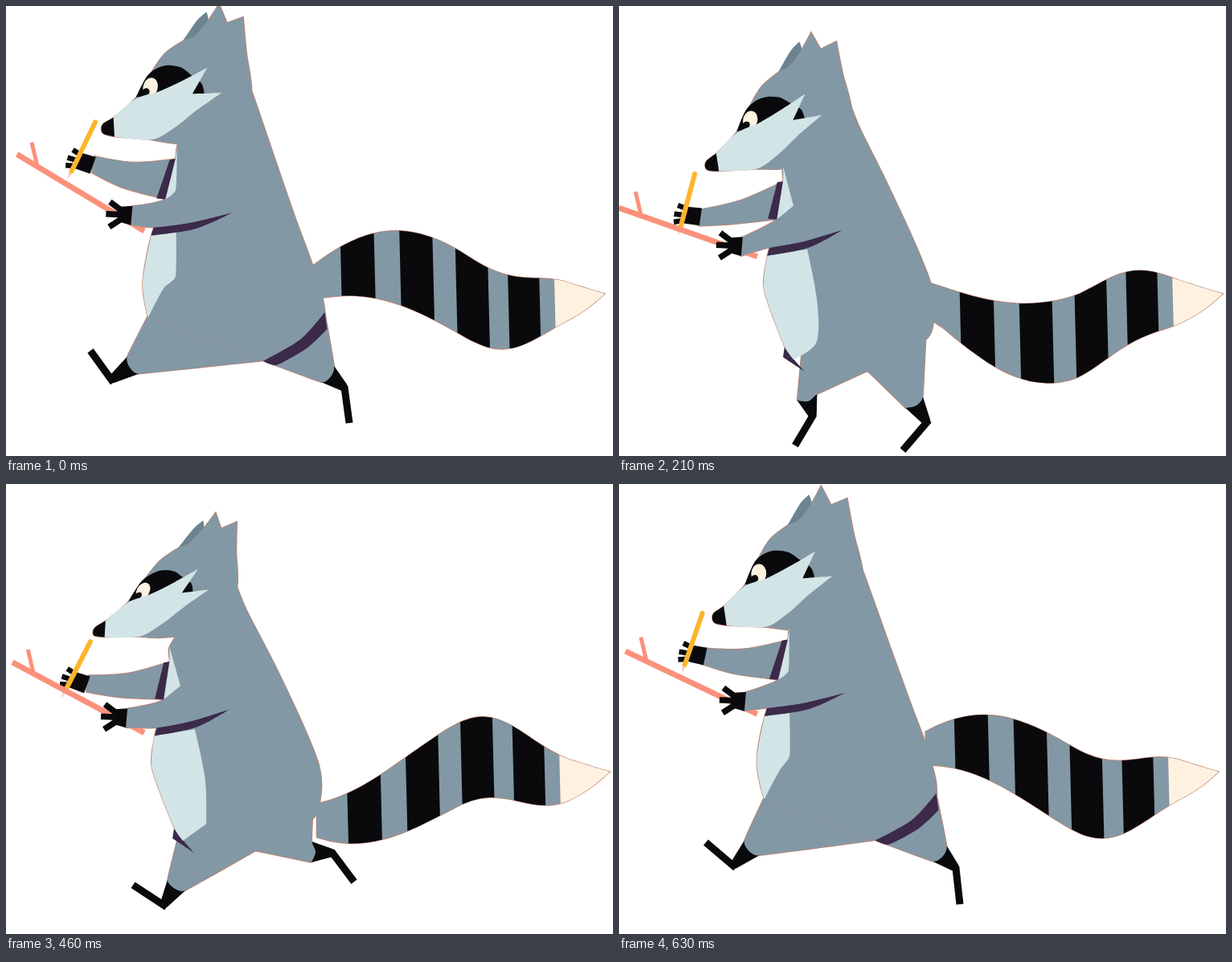
These frames come from a looping animation (755x560 px, 680 ms). An HTML page:

```html
<!DOCTYPE html>
<html lang="en">
<head>
<meta charset="utf-8">
<title>Running raccoon</title>
<style>
  html, body { margin: 0; width: 100%; height: 100%; overflow: hidden; background: #fff; }
  svg { display: block; width: 100%; height: 100%; }
</style>
</head>
<body>
<svg id="stage" viewBox="0 0 755 560"></svg>
<script>
const GREY = '#8398a5', LIGHT = '#d2e4e6', BLACK = '#0a0a0c', CREAM = '#fff1e0';
const PURPLE = '#3b2a4a', EAR = '#6b8490', YELLOW = '#fdb52a', PINK = '#fb917b', EDGE = '#cf7a60';
const LOOP = 680;

// Points are [x, y] pairs.
const pts = s => s.split('  ').map(p => p.split(' ').map(Number));
const mix = (a, b, t) => [a[0] + (b[0] - a[0]) * t, a[1] + (b[1] - a[1]) * t];
const off = (p, x, y) => [p[0] + x, p[1] + y];
const clamp = v => Math.max(0, Math.min(1, v));
const smooth = v => { const t = clamp(v); return t * t * (3 - 2 * t); };
// One step of the run lasts eight drawings, a full stride sixteen.
const swing = (k, mid, amp, lag) => mid + amp * Math.cos((k - lag) * Math.PI / 4);

// Closed outline, smooth at gentle bends and sharp at tight ones.
function blob(p) {
  const n = p.length, at = i => p[(i + n) % n];
  const tangent = i => {
    const [ax, ay] = at(i - 1), [bx, by] = at(i), [cx, cy] = at(i + 1);
    const l1 = Math.hypot(bx - ax, by - ay), l2 = Math.hypot(cx - bx, cy - by);
    const dot = ((bx - ax) * (cx - bx) + (by - ay) * (cy - by)) / (l1 * l2 || 1);
    if (dot < 0.6) return [0, 0];
    const f = Math.min(l1, l2) / 3 / Math.hypot(cx - ax, cy - ay);
    return [(cx - ax) * f, (cy - ay) * f];
  };
  return 'M' + at(0) + p.map((a, i) => {
    const b = at(i + 1), s = tangent(i), e = tangent(i + 1);
    return `C${off(a, ...s)} ${off(b, -e[0], -e[1])} ${b}`;
  }).join('') + 'Z';
}

// Torso at full reach and at its lowest, clockwise from the nape.
const REACH = pts('297 90  308 118  338 203  362 270  381 321  394 366  396 388  319 443  179 390  171 345  181 288  198 243  210 193  212 176  235 120');
const LOW = pts('284 120  299 158  334 225  371 303  390 352  392 386  381 418  310 457  210 429  182 355  185 314  196 269  203 222  203 203  240 150');

// Cuff, ankle and toe of one leg through a stride.
const STEPS = [0, 3, 5, 7, 8, 11, 13, 15];
const LEG = [
  '158 447  131 465  105 429', '212 499  196 524  158 499',
  '367 493  383 518  353 553', '399 460  419 478  424 523',
  '400 458  421 475  427 519', '380 458  406 459  433 495',
  '234 487  241 510  219 547', '165 453  142 475  108 446'].map(pts);

function legAt(k) {
  k %= 16;
  const n = STEPS.length;
  let i = n - 1;
  while (STEPS[i] > k) i--;
  const time = j => STEPS[(j + n) % n] + 16 * Math.floor(j / n);
  const h = time(i + 1) - time(i), u = (k - time(i)) / h, w = 1 - u;
  return [0, 1, 2].map(joint => [0, 1].map(axis => {
    const v = j => LEG[(j + n) % n][joint][axis];
    const slope = j => (v(j + 1) - v(j - 1)) / (time(j + 1) - time(j - 1));
    return v(i) * (1 + 2 * u) * w * w + v(i + 1) * (3 - 2 * u) * u * u +
      h * u * w * (slope(i) * w - slope(i + 1) * u);
  }));
}

// A wave runs down the tail; it eases where the body hangs in the air.
function tailAt(k) {
  const phase = k + 0.5 * Math.max(0, swing(k, 0, 1, 7)) ** 4;
  const shift = swing(k, 3.7, -3.7, 0), top = [], low = [];
  for (let i = 0; i <= 20; i++) {
    const u = i / 20, x = 380 + 365 * u + shift;
    const y = swing(phase, 371 - 13 * u ** 10, 48 * (1 - smooth((u - 0.47) / 0.4)), 2.85 + 5.7 * u);
    const half = 21 * (1 - u ** 6) + 31 * Math.sin(Math.PI * u);
    top.push([x, y - half]);
    if (i < 20) low.unshift([x, y + half]);
  }
  return { shift, outline: top.concat(low) };
}

const stage = document.getElementById('stage');
const set = (node, attrs) => { for (const a in attrs) node.setAttribute(a, attrs[a]); };
function add(tag, attrs, parent = stage) {
  const node = document.createElementNS('http://www.w3.org/2000/svg', tag);
  set(node, attrs);
  return parent.appendChild(node);
}
const draw = (node, p) => set(node, { d: blob(p) });
const fill = (color, parent) => add('path', { fill: color }, parent);
const line = (color, width, parent) =>
  add('path', { fill: 'none', stroke: color, 'stroke-width': width }, parent);
const limb = () => ({ shin: fill(BLACK), foot: line(BLACK, 9), thigh: fill(GREY) });
function hand(palm, fingers, width) {
  const g = add('g', {});
  set(fill(BLACK, g), { d: palm });
  set(line(BLACK, width, g), { d: fingers });
  return g;
}

// Layers, back to front
const clip = add('path', {}, add('clipPath', { id: 'tail' }));
const rims = Array.from({ length: 6 }, () =>
  add('path', { fill: EDGE, stroke: EDGE, 'stroke-width': 1.3 }));
const headRim = add('path', { fill: EDGE, stroke: EDGE, 'stroke-width': 1.3 });
const tail = fill(GREY);
const stripes = add('g', {}, add('g', { 'clip-path': 'url(#tail)' }));
for (let i = 0; i < 5; i++)
  add('path', { d: `M${415 + 76 * i - 2.3 * i * i} 260h${i < 4 ? 42 - i : 90}l6 240H${421 + 76 * i - 2.3 * i * i}Z`,
    fill: BLACK }, stripes);
set(stripes.lastChild, { d: 'M680 260h90v240h-84Z', fill: CREAM });
const farLeg = limb();
const farSleeve = fill(GREY);
const farHand = hand('M13-10L11 12L-8 10L-8-11Z', 'M-5-8L-17-12M-5 0L-21-1M-5 6L-21 9', 6.5);
set(fill('#f6d3c0', farHand), { d: 'M-15 13l6 1l-6 12Z' });
set(line(YELLOW, 6, farHand), { d: 'M-12 14L2-52', 'stroke-linecap': 'round' });
const twig = line(PINK, 5), branch = line(PINK, 7);
const headBack = add('g', {});
draw(fill(EAR, headBack), pts('92 -109  107 -135  118 -146  121 -135  106 -115'));
const trunk = fill(GREY);
const nearLeg = limb();
const rear = fill(PURPLE), front = fill(PURPLE);
const head = add('g', {});
const HEAD = pts('95 20  64 16  18 13  4 10  0 4  2 -3  14 -11  40 -37  54 -65  70 -92  92 -109  106 -115  121 -135  133 -157  146 -133  166 -141  175 -97  188 -42  180 20');
draw(fill(GREY, head), HEAD);
draw(headRim, HEAD);
draw(fill(BLACK, head), pts('40 -37  52 -65  70 -77  92 -76  108 -66  122 -56  127 -43  109 -42'));
add('ellipse', { cx: 57, cy: -50, rx: 9.5, ry: 12, fill: CREAM }, head);
add('circle', { cx: 52, cy: -44, r: 4.6, fill: BLACK }, head);
draw(fill(LIGHT, head), pts('14 -11  40 -35  69 -45  99 -60  127 -76  112 -43  149 -45  119 -22  94 0  66 16  18 13'));
draw(fill(BLACK, head), pts('14 -11  2 -3  0 4  4 10  18 13  16 1'));
const bellyPatch = fill(LIGHT), chestPatch = fill(LIGHT);
const armShade = fill(PURPLE), underArm = fill(PURPLE);
const sleeve = fill(GREY);
const nearHand = hand('M10-11L8 13L-6 9L-10-2L-5-10Z', 'M-2-4L-18-16M-2 0L-23-1M-2 4L-19 15', 7.5);

// How far back a leg is: 0 in front, 1 behind.
const backness = leg => clamp((leg[0][0] - 200) / 170);

function drawLeg(parts, [cuff, ankle, toe], hipL, hipR) {
  const dx = ankle[0] - cuff[0], dy = ankle[1] - cuff[1], len = Math.hypot(dx, dy);
  const side = (p, r) => off(p, dy / len * r, -dx / len * r);
  const left = side(cuff, -13), right = side(cuff, 13);
  const thigh = [hipL, left, off(cuff, dx / len * 5, dy / len * 5), right, hipR];
  draw(parts.thigh, thigh);
  set(parts.shin, { d: `M${[left, right, side(ankle, 5), side(ankle, -5)].join('L')}Z` });
  set(parts.foot, { d: `M${[cuff, ankle, toe].join('L')}` });
  return thigh;
}

function render(k) {
  const low = swing(k, 0.5, 0.6, 3.85);
  const body = REACH.map((p, i) => mix(p, LOW[i], low));
  const [hip, crotch, groin, waist, ribs, armpit, chest, chin] = body.slice(6, 14);
  draw(trunk, body);

  const place = leg => {
    const b = backness(leg);
    return [mix(groin, crotch, b), mix(crotch, hip, b)];
  };
  const near = legAt(k), far = legAt(k + 8), s = backness(near);
  const nearThigh = drawLeg(nearLeg, near, ...place(near));
  const farThigh = drawLeg(farLeg, far, ...place(far));

  const mid = mix(crotch, hip, 0.6);
  draw(rear, [crotch, off(mid, 0, 7), off(hip, -1, -4), off(hip, 2, 17), off(mid, 8, 18), off(crotch, 17, 5)]);
  draw(front, [groin, off(groin, -2, 13), off(groin, 25, 31), off(groin, 10, 14)]);
  set(rear, { visibility: s < 0.3 ? 'visible' : 'hidden' });
  set(front, { visibility: s > 0.7 ? 'visible' : 'hidden' });
  draw(bellyPatch, [ribs, off(ribs, 31 + 19 * s, -5 - 3 * s), off(waist, 41 + 25 * s, -8 + 20 * s),
    off(groin, 20 + 20 * s, -35 + 30 * s), off(groin, 1 + 10 * s, 1 + 15 * s), groin, waist]);
  draw(chestPatch, [chin, off(armpit, 13 + 8 * s, -12 - 5 * s), armpit, chest]);

  const { shift, outline } = tailAt(k);
  [tail, clip].forEach(node => draw(node, outline));
  set(stripes, { transform: `translate(${shift})` });

  const skew = [swing(k, 0.95, 0.05, -1.5), swing(k, -0.045, 0.075, 0.6),
    swing(k, -0.11, -0.13, 2), swing(k, 0.94, 0.07, -1)];
  const pose = `matrix(${skew} ${swing(k, 112.5, 6.5, 0.25)} ${swing(k, 172, -25, 0.55)})`;
  [head, headBack, headRim].forEach(node => set(node, { transform: pose }));

  const nearAt = [swing(k, 144.5, 3.5, -0.8), swing(k, 280, -21, 0.35)];
  const shoulder = mix([281, 259], [278, 281], low);
  const elbow = off(ribs, 3, -10), under = off(mix(ribs, shoulder, 0.5), 0, -2);
  const arm = [shoulder, off(shoulder, -50, -40), armpit, off(nearAt, 10, -11), off(nearAt, 8, 13), elbow, under];
  draw(sleeve, arm);
  draw(underArm, [elbow, under, shoulder, off(under, 5, 8), ribs]);
  set(nearHand, { transform: `translate(${nearAt})` });

  const farAt = [swing(k, 92.5, 4.2, 0), swing(k, 229, -36, 0.38)];
  const cuffTop = off(farAt, 13, -8), cuffLow = off(farAt, 10, 13);
  const farArm = [cuffTop, off(mix(cuffTop, chest, 0.5), -2, 6), chest, armpit,
    off(mix(cuffLow, armpit, 0.5), -8, 2), cuffLow];
  draw(farSleeve, farArm);
  draw(armShade, [off(chest, -7, 1), chest, armpit, off(armpit, -11, -1)]);
  set(farHand, { transform: `translate(${farAt}) rotate(${swing(k, 11, 9, 1.6)})` });

  const tip = [swing(k, 8, 8, 1), swing(k, 215, -37, 0.76)], end = [172, swing(k, 298, -18, 0.1)];
  const fork = mix(tip, end, 0.16);
  set(branch, { d: `M${tip}L${end}` });
  set(twig, { d: `M${fork}L${off(fork, -7, -30)}` });

  [outline, body, nearThigh, farThigh, arm, farArm].forEach((p, i) => draw(rims[i], p));
}

// Sixteen drawings at 24 per second, timed in hundredths.
const start = performance.now();
let shown = -1;
function tick() {
  const tens = Math.floor((performance.now() - start) % LOOP / 10);
  const k = Math.min(15, Math.floor((tens + 0.5) * 0.24 + 1e-9));
  if (k !== shown) render(shown = k);
  requestAnimationFrame(tick);
}
tick();
</script>
</body>
</html>
```
